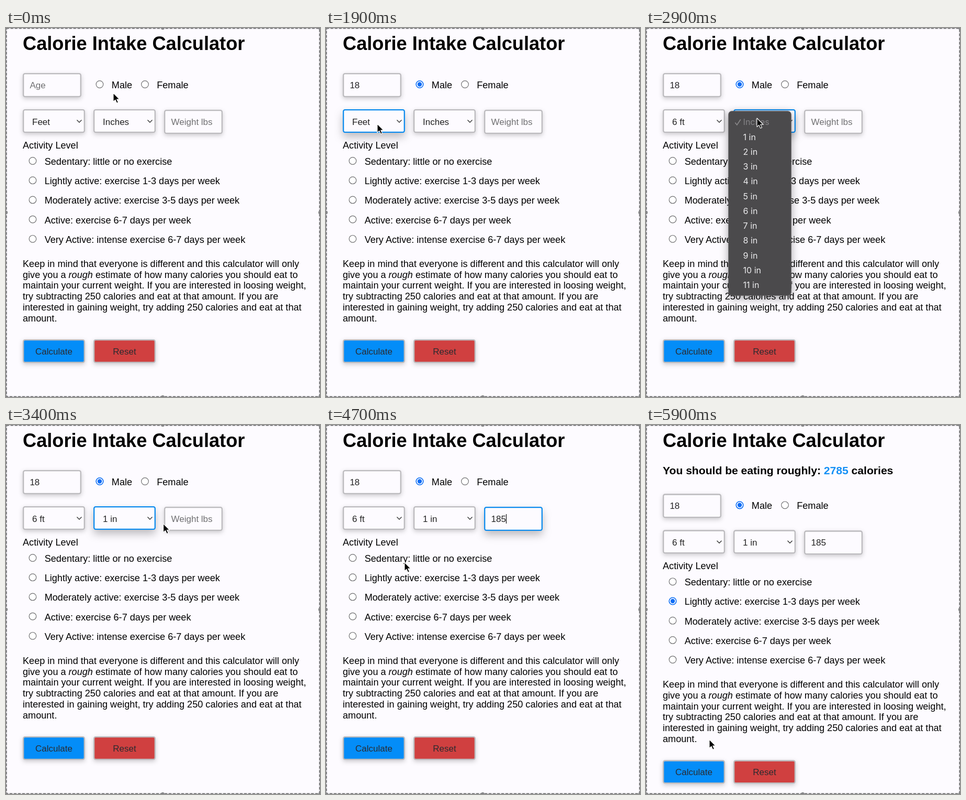
These frames come from a looping animation (600x704 px, 6000 ms). An HTML page:

```html
<!DOCTYPE html>
<html lang="en">
<head>
<meta charset="utf-8">
<title>Calorie Intake Calculator</title>
<style>
html, body { margin: 0; width: 100%; height: 100%; overflow: hidden; background: #fdfbff; }
svg { display: block; width: 600px; height: 704px; font: 18.13px "Liberation Sans", Arial, sans-serif; }
text { white-space: pre; }
.box { fill: #fdfbff; stroke: #bcbbbe; stroke-width: 2.3; filter: drop-shadow(0 3px 4px rgba(0,0,0,.2)); }
.box.lift { filter: drop-shadow(0 8px 8px rgba(0,0,0,.25)); }
.box.focus { stroke: #0d8cee; }
.ctl { font-size: 17px; fill: #222; }
.hint { fill: #707072; }
.btn { text-anchor: middle; fill: #2b2b30; }
.ring { fill: #fff; stroke: #707072; stroke-width: 1.2; }
.dot { fill: none; }
.on .ring { stroke: #0a6cf5; stroke-width: 1.6; }
.on .dot { fill: #0a6cf5; }
.menu { font: 16px Inter, "Open Sans", sans-serif; fill: #ececee; }
.panel { fill: #4b4a4c; stroke: #5d5c5e; filter: drop-shadow(0 5px 8px rgba(0,0,0,.35)); }
.line { fill: none; stroke: #333; stroke-width: 1.4; }
</style>
</head>
<body>
<svg id="stage" viewBox="0 0 600 704"></svg>
<script>
const LOOP = 6000, STEP = 100, SHIFT = 45.3;
const stage = document.getElementById('stage');

function add(parent, tag, attrs = {}, text = '') {
  const el = document.createElementNS('http://www.w3.org/2000/svg', tag);
  for (const k in attrs) el.setAttribute(k, attrs[k]);
  el.textContent = text;
  parent.append(el);
  return el;
}
const label = (parent, x, y, str, cls = '') => add(parent, 'text', { x, y, class: cls }, str);
const show = (el, on) => { el.style.display = on ? '' : 'none'; };

// Title and result line
const head = label(stage, 32, 42, 'Calorie Intake Calculator');
head.setAttribute('style', 'font-size:36.2px;font-weight:700');
const result = label(stage, 32, 94, 'You should be eating roughly: ');
result.setAttribute('style', 'font-size:21.1px;font-weight:700');
add(result, 'tspan', { fill: '#1590f5' }, '2785');
result.append(' calories');

const form = add(stage, 'g');

// Fields and buttons
const boxes = {};
function box(id, x, y, w, h, fill) {
  const el = add(form, 'rect', { x: x + 1.2, y: y + 1.2, width: w - 2.4, height: h - 2.4, rx: 3, class: 'box' });
  if (fill) el.style.fill = fill;
  boxes[id] = { el, x, y, w, h };
}
box('age', 32, 86, 112, 46);
box('feet', 32, 155, 119, 45);
box('inches', 167, 155, 119, 45);
box('weight', 302, 156, 112, 46);
box('calc', 32, 594, 119, 45, '#048df8');
box('reset', 167, 594, 119, 45, '#d04040');

const texts = {
  age: label(form, 45.4, 115, '', 'ctl'),
  feet: label(form, 50, 185, '', 'ctl'),
  inches: label(form, 185, 185, '', 'ctl'),
  weight: label(form, 315.5, 185, '', 'ctl')
};
const hints = { age: 'Age', feet: 'Feet', inches: 'Inches', weight: 'Weight lbs' };
for (const x of [140, 275]) add(form, 'path', { d: `M${x - 4.5} 175.5l4.5 4.5l4.5-4.5`, class: 'line' });
label(form, 91.5, 623, 'Calculate', 'ctl btn');
label(form, 226.5, 623, 'Reset', 'ctl btn');
const caret = add(form, 'rect', { width: 1.2, height: 18, fill: '#111' });

// Radio buttons
function radio(cx, cy, x, y, str) {
  const g = add(form, 'g');
  add(g, 'circle', { cx, cy, r: 6.8, class: 'ring' });
  add(g, 'circle', { cx, cy, r: 4.2, class: 'dot' });
  label(g, x, y, str);
  return g;
}
const male = radio(179, 107.5, 201.8, 115, 'Male');
radio(265.5, 107.5, 288.2, 115, 'Female');
label(form, 32, 230.2, 'Activity Level');
const levels = [
  'Sedentary: little or no exercise',
  'Lightly active: exercise 1-3 days per week',
  'Moderately active: exercise 3-5 days per week',
  'Active: exercise 6-7 days per week',
  'Very Active: intense exercise 6-7 days per week'
].map((s, i) => radio(51, 253.5 + 37.2 * i, 73.7, 260.8 + 37.25 * i, s));

// Note
[
  'Keep in mind that everyone is different and this calculator will only',
  'give you a *rough* estimate of how many calories you should eat to',
  'maintain your current weight. If you are interested in loosing weight,',
  'try subtracting 250 calories and eat at that amount. If you are',
  'interested in gaining weight, try adding 250 calories and eat at that',
  'amount.'
].forEach((s, i) => {
  const row = label(form, 32, 455.7 + 20.83 * i, '');
  s.split('*').forEach((part, k) => add(row, 'tspan', k % 2 ? { 'font-style': 'italic' } : {}, part));
});

// Selection frame with handles
add(stage, 'rect', { x: .8, y: .8, width: 598.4, height: 702.4, fill: 'none', stroke: '#d4d3d6', 'stroke-width': 1.6 });
add(stage, 'rect', { x: .8, y: .8, width: 598.4, height: 702.4, fill: 'none', stroke: '#6c6c6e', 'stroke-width': 1.6, 'stroke-dasharray': '5 3' });
for (const x of [0, 299.5, 600]) for (const y of [0, 352, 704])
  if (x !== 299.5 || y !== 352) add(stage, 'circle', { cx: x, cy: y, r: 3.2, fill: '#858587' });

// Drop-down menus
function menu(x, title, unit, count) {
  const g = add(stage, 'g', { class: 'menu' });
  add(g, 'rect', { x, y: 158.8, width: 119.4, height: 40.7 + 28.25 * count, rx: 6, class: 'panel' });
  add(g, 'path', { d: `M${x + 12.5} 180.5l3.5 4.5l7-10.5`, class: 'line', style: 'stroke:#8b8a8c;stroke-width:1.6' });
  for (let i = 0; i <= count; i++) {
    const row = label(g, x + 27.8, 185.4 + 28.25 * i, i ? `${i} ${unit}` : title);
    if (!i) row.style.fill = '#858487';
  }
  return g;
}
const menus = { feet: menu(23.2, 'Feet', 'ft', 8), inches: menu(157.8, 'Inches', 'in', 11) };

// Pointers
const arrow = add(stage, 'path', {
  d: 'M0 0V16.6L3.8 13.1L6.7 19.2L9.5 17.9L6.7 12H11.9Z',
  fill: '#000', stroke: '#fff', 'stroke-width': 1.1, 'stroke-linejoin': 'round'
});
const beam = add(stage, 'path', { d: 'M-3-8.5Q0-8.5 0-6Q0-8.5 3-8.5M0-6V6M-3 8.5Q0 8.5 0 6Q0 8.5 3 8.5', class: 'line' });

// time, x, y
const path = [
  [0, 205, 124], [100, 203, 125], [300, 160, 119], [500, 105, 110], [1200, 102, 111],
  [1300, 136, 110], [1400, 172, 107], [1500, 176, 106], [1600, 172, 112], [1800, 110, 170],
  [1900, 98, 183], [2100, 98, 186], [2300, 99, 250], [2500, 99, 334], [2600, 98, 345],
  [2700, 150, 250], [2800, 211, 175], [2900, 212, 172], [3000, 212, 183], [3100, 210, 204],
  [3200, 212, 203], [3500, 345, 181], [4500, 345, 184], [4700, 150, 262], [4800, 55, 288],
  [4900, 50, 289], [5000, 52, 300], [5200, 100, 540], [5300, 115, 602], [5400, 118, 606],
  [5500, 130, 614], [5800, 130, 614], [5900, 121, 600]
];
// time, changes
const events = [
  [0, { focus: '', open: '', age: '', feet: '', inches: '', weight: '', typing: false, male: false, level: false, done: false }],
  [600, { focus: 'age' }],
  [900, { age: '1', typing: true }],
  [1000, { age: '18' }],
  [1200, { typing: false }],
  [1500, { focus: '', male: true }],
  [1900, { focus: 'feet' }],
  [2000, { open: 'feet' }],
  [2600, { open: '', feet: '6 ft' }],
  [2800, { focus: 'inches' }],
  [2900, { open: 'inches' }],
  [3200, { open: '', inches: '1 in' }],
  [3600, { focus: 'weight' }],
  [3900, { weight: '1', typing: true }],
  [4100, { weight: '18' }],
  [4300, { weight: '185' }],
  [4500, { typing: false }],
  [4900, { focus: '', level: true }],
  [5500, { done: true }]
];

function pointerAt(t) {
  const i = path.findLastIndex(p => p[0] <= t);
  const a = path[i], b = path[i + 1] || a;
  const f = b === a ? 0 : (t - a[0]) / (b[0] - a[0]);
  return [a[1] + (b[1] - a[1]) * f, a[2] + (b[2] - a[2]) * f];
}

function draw(t) {
  const s = Object.assign({}, ...events.filter(e => e[0] <= t).map(e => e[1]));
  const [px, py] = pointerAt(t);
  const dy = s.done ? SHIFT : 0;
  form.setAttribute('transform', `translate(0 ${dy})`);
  show(result, s.done);

  let over = '';
  for (const id in boxes) {
    const { el, x, y, w, h } = boxes[id];
    const hit = !s.open && px >= x && px <= x + w && py >= y + dy && py <= y + h + dy;
    if (hit) over = id;
    el.classList.toggle('focus', s.focus === id);
    el.classList.toggle('lift', s.focus === id || (hit && !s.typing));
  }
  for (const id in texts) {
    texts[id].textContent = s[id] || hints[id];
    texts[id].classList.toggle('hint', !s[id] && (id === 'age' || id === 'weight'));
  }
  for (const id in menus) show(menus[id], s.open === id);
  male.classList.toggle('on', s.male);
  levels[1].classList.toggle('on', s.level);

  const input = s.focus === 'age' || s.focus === 'weight';
  show(caret, input);
  if (input) {
    const el = texts[s.focus];
    caret.setAttribute('x', +el.getAttribute('x') + (s[s.focus] ? el.getComputedTextLength() : 0));
    caret.setAttribute('y', el.getAttribute('y') - 15);
  }

  const text = over === 'age' || over === 'weight';
  show(arrow, !s.typing && !text);
  show(beam, !s.typing && text);
  for (const p of [arrow, beam]) p.setAttribute('transform', `translate(${px} ${py})`);
}

const start = performance.now();
function tick() {
  const t = (performance.now() - start) % LOOP;
  draw(Math.floor(t / STEP) * STEP);
  requestAnimationFrame(tick);
}
tick();
</script>
</body>
</html>
```
